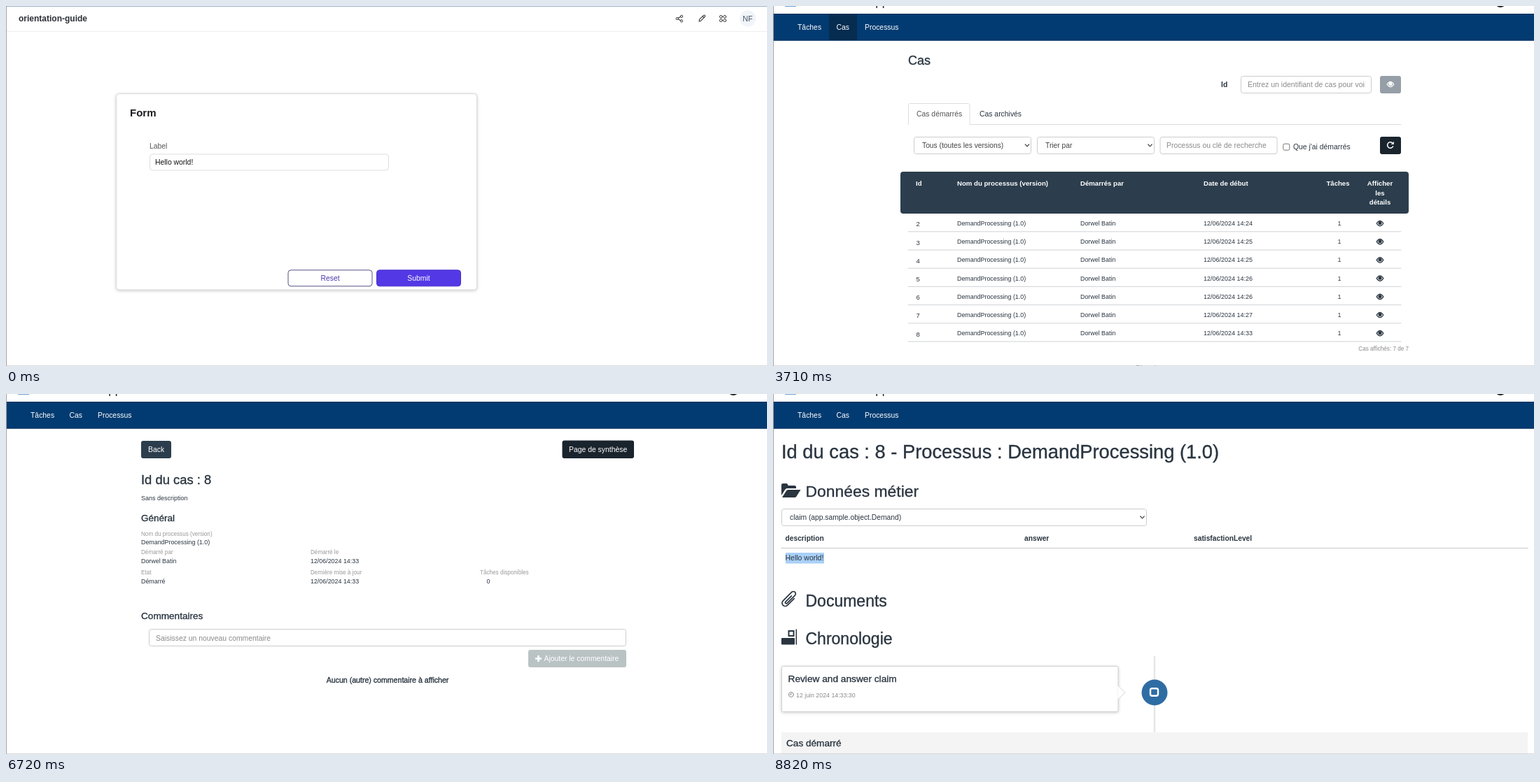
An HTML page for the animation above (9.17 s loop, 1087 by 515 pixels).

```html
<!DOCTYPE html>
<html lang="fr">
<head>
<meta charset="utf-8">
<title>Form to case walkthrough</title>
<style>
  html, body { margin: 0; width: 100%; height: 100%; overflow: hidden; background: #fff; }
  svg { display: block; width: 1087px; height: 515px; font-family: "Liberation Sans", Arial, sans-serif; }
  text { white-space: pre; }
  .bold { font-weight: bold; }
  .medium { stroke: currentColor; stroke-width: .35px; }
  .mid { text-anchor: middle; }
  .end { text-anchor: end; }
  .card { filter: drop-shadow(0 1px 2px #0003); }
  .glow { filter: drop-shadow(0 0 2px #0008); }
  .line { fill: none; stroke: currentColor; stroke-linecap: round; stroke-linejoin: round; }
</style>
</head>
<body>
<svg id="stage" viewBox="0 0 1087 515"></svg>
<script>
const INK = '#2a3540', SLATE = '#2c3e4d', HOVER = '#1a242d', PRESSED = '#0d1318';
const GREY = '#8a8a8a', BORDER = '#ccc', PURPLE = '#5339e6';
const PROCESS = 'DemandProcessing (1.0)', USER = 'Dorwel Batin';

const text = (x, y, str, size = 10.4, color = INK, cls = '', id = '') =>
  `<text id="${id}" x="${x}" y="${y}" font-size="${size}" fill="${color}" color="${color}" class="${cls}">${str}</text>`;
const box = (x, y, w, h, fill = '#fff', stroke = 'none', r = 3, extra = '') =>
  `<rect x="${x}" y="${y}" width="${w}" height="${h}" rx="${r}" fill="${fill}" stroke="${stroke}" ${extra}/>`;
const line = (d, color, width = 1, extra = '') =>
  `<path class="line" d="${d}" color="${color}" stroke-width="${width}" ${extra}/>`;
const field = (x, y, w, h = 25) => box(x + .5, y + .5, w - 1, h - 1, '#fff', BORDER);
const chevron = (x, y) => line(`M${x - 2.7} ${y - 1.5}l2.7 2.8 2.7-2.8`, '#444', 1.2);
const group = (id, ...parts) => `<g id="${id}">${parts.join('')}</g>`;
const eye = (x, y, color, id = '') =>
  `<g id="${id}" transform="translate(${x} ${y})" color="${color}" fill="currentColor">
    <path class="line" stroke-width="1.3" d="M-4.8 0Q0-7.4 4.8 0Q0 7.4-4.8 0Z"/>
    <circle cy="-.4" r="2.5"/></g>`;

function formPage() {
  const dots = [-2.7, 2.7].map(dx => [-2.7, 2.7].map(dy =>
    `<circle class="line" color="#333" cx="${1024 + dx}" cy="${18 + dy}" r="1.9"/>`).join('')).join('');
  return group('form',
    line('M1 .5H1087', '#9fb2c5'),
    text(18, 22, 'orientation-guide', 12, '#2b2f36', 'bold'),
    line('M1 36.5H1087', '#eee'),
    line('M964.5 14.8L958.8 18L964.5 21.3', '#333', 1.1),
    [[965, 14.8], [958.6, 18], [965, 21.4]].map(([x, y]) =>
      `<circle cx="${x}" cy="${y}" r="1.6" fill="#fff" stroke="#333"/>`).join(''),
    line('M990 22l.6-2.8 5.8-5.8q1-.8 1.9.1.9 1-.1 1.9l-5.7 5.8zM995 14.6l2 2', '#333', 1.1),
    dots,
    '<circle cx="1059.5" cy="18" r="11.7" fill="#f1f5f9"/>',
    text(1059.5, 22, 'NF', 10.8, '#475569', 'mid'),
    box(157.5, 125.5, 515, 280.5, '#fff', '#d9d9de', 4, 'class="card"'),
    text(177, 158, 'Form', 15, '#1b1b1f', 'bold'),
    text(205, 204, 'Label', 10.4, '#555'),
    box(205.5, 212, 341, 23, '#fff', '#dedee3', 4),
    text(213, 227, 'Hello world!', 10.4, '#111', '', 'typed'),
    box(403, 377.8, 120, 23, '#fff', '#55517f', 4),
    text(463, 393, 'Reset', 10.4, '#4b3bab', 'mid'),
    box(529.5, 377.8, 120, 23, PURPLE, '#4930c9', 4, 'id="submit"'),
    text(589.5, 393, 'Submit', 10.4, '#fff', 'mid', 'submitText'),
    line('M589.5 383.8a5.5 5.5 0 0 1 5.5 5.5', '#fff', 1.6, 'id="spinner"'));
}

function navBar() {
  return group('nav',
    box(17, -15, 16, 16, '#6f9fd0', 'none', 0),
    text(44, .3, 'Zorvia User Application', 16.9, '#222'),
    '<circle class="line" color="#222" stroke-width="2" cx="1039" cy="-6" r="7"/>',
    box(1, 11, 1086, 38.5, '#023b71', 'none', 0),
    line('M1 11.5H1087M1 49H1087', '#022f5c'),
    box(80, 12, 40, 37, '#062c50', 'none', 0, 'id="activeTab"'),
    text(35, 34, 'Tâches', 10.4, '#fff'),
    text(90.5, 34, 'Cas', 10.4, '#fff'),
    text(131, 34, 'Processus', 10.4, '#fff'));
}

function caseRow(i, time) {
  const y = 314 + 26.2 * i, last = i === 6;
  return group('row' + i,
    line(`M193 ${y + 8.8}H897`, '#cfd2d4'),
    last ? box(193.5, 454.5, 703.5, 25.5, '#fff', '#8d9296', 1, 'id="glow" class="glow"') : '',
    text(204.5, y + 1.3, i + 2, 9.5),
    text(263, y, PROCESS, 8.9),
    text(439, y, USER, 8.9),
    text(615, y, '12/06/2024 14:' + time, 9),
    text(809, y, 1, 9, INK, 'mid'),
    eye(867, y - 3, INK, last ? 'lastEye' : ''));
}

function listPage() {
  const head = (x, y, str, cls = '') => text(x, y, str, 9.65, '#fff', 'bold ' + cls);
  const footer = (id, count, dy) => group(id,
    text(908, 466.3 + dy, `Cas affichés: ${count} de ${count}`, 8.15, GREY, 'end'),
    text(545, 495.5 + dy, 'Plus de cas', 10.4, GREY, 'mid'));
  return group('list',
    text(193, 84, 'Cas', 18, INK, 'medium'),
    text(640, 116, 'Id', 10.4, INK, 'bold'),
    field(668, 100, 187),
    '<clipPath id="inner"><path d="M670 100h175.5v25H670z"/></clipPath><g clip-path="url(#inner)">',
    text(678, 116, 'Entrez un identifiant de cas pour voir', 10.5, GREY), '</g>',
    box(867, 100, 30, 25, '#969fa7'), eye(882, 112, '#fff'),
    line('M281.5 169.5H897M193.5 169.5V142q0-2.5 2.5-2.5h82.500q2.500 0 2.500 2.500V169.500', '#ddd'),
    text(205, 158, 'Cas démarrés', 10.4, '#555'),
    text(295, 158, 'Cas archivés'),
    field(201, 187, 168), text(213, 203, 'Tous (toutes les versions)', 10.25, '#444'), chevron(363, 199.5),
    field(377, 187, 168), text(389, 203, 'Trier par', 10.25, '#444'), chevron(538.5, 199.5),
    field(552.5, 187, 168), text(562, 203, 'Processus ou clé de recherche', 10.4, GREY),
    box(728.8, 197.2, 9, 9, '#fff', '#767676', 2),
    text(743, 205.3, "Que j'ai démarrés"),
    box(867, 187, 30, 25, SLATE, 'none', 3, 'id="refresh"'),
    line('M885.6 200.8a4.200 4.200 0 1 1-.8-4.700', '#fff', 1.5),
    '<path d="M886.800 193.800v4.200h-4.200z" fill="#fff"/>',
    box(182, 237, 726, 60, SLATE, 'none', 4),
    head(204, 257, 'Id'), head(263, 257, 'Nom du processus (version)'),
    head(439, 257, 'Démarrés par'), head(615, 257, 'Date de début'), head(807, 257, 'Tâches', 'mid'),
    ['Afficher', 'les', 'détails'].map((word, i) => head(867, 257 + 13.7 * i, word, 'mid')).join(''),
    [24, 25, 25, 26, 26, 27, 33].map((time, i) => caseRow(i, time)).join(''),
    footer('footBefore', 6, 0), footer('footAfter', 7, 26.2));
}

function detailPage() {
  const pair = (x, y, label, value, dx = 0) =>
    text(x, y, label, 8.15, '#999') + text(x + dx, y + 12.8, value, 8.9);
  return group('detail',
    box(193, 67, 43, 25, SLATE), text(203, 83, 'Back', 10.4, '#fff'),
    box(794.5, 66.5, 102.5, 25.5, SLATE, 'none', 3, 'id="summary"'),
    text(804, 83, 'Page de synthèse', 10.4, '#fff'),
    text(193, 128.5, 'Id du cas : 8', 18.4, INK, 'medium'),
    text(193, 151.5, 'Sans description', 9),
    text(193, 182, 'Général', 13.5, INK, 'medium'),
    pair(193, 202.6, 'Nom du processus (version)', PROCESS),
    pair(193, 229.4, 'Démarré par', USER),
    pair(435, 229.4, 'Démarré le', '12/06/2024 14:33'),
    pair(193, 258, 'Etat', 'Démarré'),
    pair(435, 258, 'Dernière mise à jour', '12/06/2024 14:33'),
    pair(677, 258, 'Tâches disponibles', '0', 9.5),
    text(193, 321.5, 'Commentaires', 13.6, INK, 'medium'),
    field(204, 336, 682), text(214, 352.5, 'Saisissez un nouveau commentaire', 10.4, GREY),
    box(746, 366, 140, 25, '#bac3c4'),
    '<path d="M756 378.500h9M760.500 374v9" stroke="#fff" stroke-width="2.700"/>',
    text(768.5, 382.3, 'Ajouter le commentaire', 10.4, '#fff'),
    text(545, 413, 'Aucun (autre) commentaire à afficher', 10.6, INK, 'medium mid'));
}

function summaryPage() {
  return group('overview',
    text(12, 92.300, 'Id du cas : 8 - Processus : ' + PROCESS, 27.3, INK, 'medium'),
    `<path fill="${INK}" d="M12 145V130q0-2 2-2h6l2 3h9q2 0 2 2v2H20q-1.500 0-2.500 1.500z
      M13 148l6-9.500q.8-1.500 2.500-1.500H39.500l-6 9.500q-1 1.500-2.500 1.500z"/>`,
    text(46.5, 147, 'Données métier', 22.9, INK, 'medium'),
    field(12, 164, 522), chevron(527.5, 176.5),
    text(24, 180, 'claim (app.sample.object.Demand)', 10.3),
    text(17.5, 210, 'description', 10.25, INK, 'bold'),
    text(359, 210, 'answer', 10.25, INK, 'bold'),
    text(601, 210, 'satisfactionLevel', 10.25, INK, 'bold'),
    line('M12 220.5H1078', '#d5d5d5', 1.5),
    box(18, 227, 55, 15.5, '#a9d0f8', 'none', 0, 'id="selection"'),
    text(17.5, 238, 'Hello world!', 10.5),
    line('M4.500-5V8.500a4.500 4.500 0 0 1-9 0V-9a3.300 3.300 0 0 1 6.600 0V7a1.500 1.500 0 0 1-3 0V-5',
      INK, 1.7, 'transform="translate(23.500 293) rotate(45)"'),
    text(46.5, 304, 'Documents', 23, INK, 'medium'),
    box(12, 349, 19, 9.5, INK, 'none', 1), box(22.5, 339, 7, 7, '#fff', INK, 0, 'stroke-width="2"'),
    line('M33.300 337V358', INK, 1.5),
    text(46.5, 358, 'Chronologie', 23, INK, 'medium'),
    group('timeline',
      line('M545 376V484', '#e6e6e6', 2.5),
      '<circle cx="545" cy="427" r="18.5" fill="#2e6da4"/>',
      box(539, 421.3, 11, 10.5, 'none', '#fff', 2.5, 'stroke-width="2.4"'),
      box(12.5, 389.5, 480.5, 65, '#fff', '#d0d0d0', 2, 'class="card"'),
      '<path d="M492.500 417l10.500 10-10.500 10" fill="#fff" stroke="#d8d8d8"/>',
      text(21.5, 411.7, 'Review and answer claim', 13.7, INK, 'medium'),
      line('M29.400 430a3.500 3.500 0 1 1-7 0 3.500 3.500 0 1 1 7 0M25.900 428v2.200h-1.500', GREY),
      text(33, 433.5, '12 juin 2024 14:33:30', 8.8, GREY),
      box(12, 484, 1066, 31, '#f4f4f4', 'none', 0),
      text(19, 504, 'Cas démarré', 13.6, INK, 'medium')));
}

const stage = document.getElementById('stage');
stage.innerHTML = formPage() + navBar() + listPage() + detailPage() + summaryPage()
  + line('M.5 0V515', '#a2a2a2') + line('M0 514.700H1087', '#b5b5b5', .6);

const el = id => document.getElementById(id);
const show = (id, on) => { el(id).style.display = on ? '' : 'none'; };
const fill = (id, color) => el(id).setAttribute('fill', color);

const LOOP = 9170, STEP = 70;

function draw(now) {
  const t = now % LOOP;
  const during = (from, to = LOOP) => t >= from && t < to;

  // Form submission
  const sending = during(700, 1260);
  show('form', t < 1960);
  show('typed', t < 1190);
  show('submitText', !sending);
  show('spinner', sending);
  fill('submit', during(350, 1260) ? '#462bd4' : PURPLE);
  el('spinner').setAttribute('transform', `rotate(${(t - 700) * .72} 589.5 389.3)`);

  // Case list
  const refreshed = t >= 3500;
  show('nav', during(1960, 5320) || t >= 5950);
  show('activeTab', t < 5320);
  show('list', during(1960, 5320));
  show('row6', refreshed);
  show('footBefore', !refreshed);
  show('footAfter', refreshed);
  show('glow', t >= 4620);
  el('lastEye').setAttribute('color', t >= 4830 ? '#000' : INK);
  fill('refresh', during(3290, 3430) ? PRESSED : during(3010, 4970) ? HOVER : SLATE);

  // Case details
  show('detail', during(6090, 6930));
  fill('summary', t >= 6790 ? PRESSED : t >= 6720 ? HOVER : SLATE);

  // Overview and text selection
  show('overview', t >= 7070);
  show('timeline', t >= 7210);
  const selected = Math.max(0, Math.min(4, Math.floor((t - 8610) / STEP) + 1));
  el('selection').setAttribute('width', 55 * selected / 4);

  requestAnimationFrame(tick);
}

const start = performance.now();
function tick() { draw(performance.now() - start); }
tick();
</script>
</body>
</html>
```
